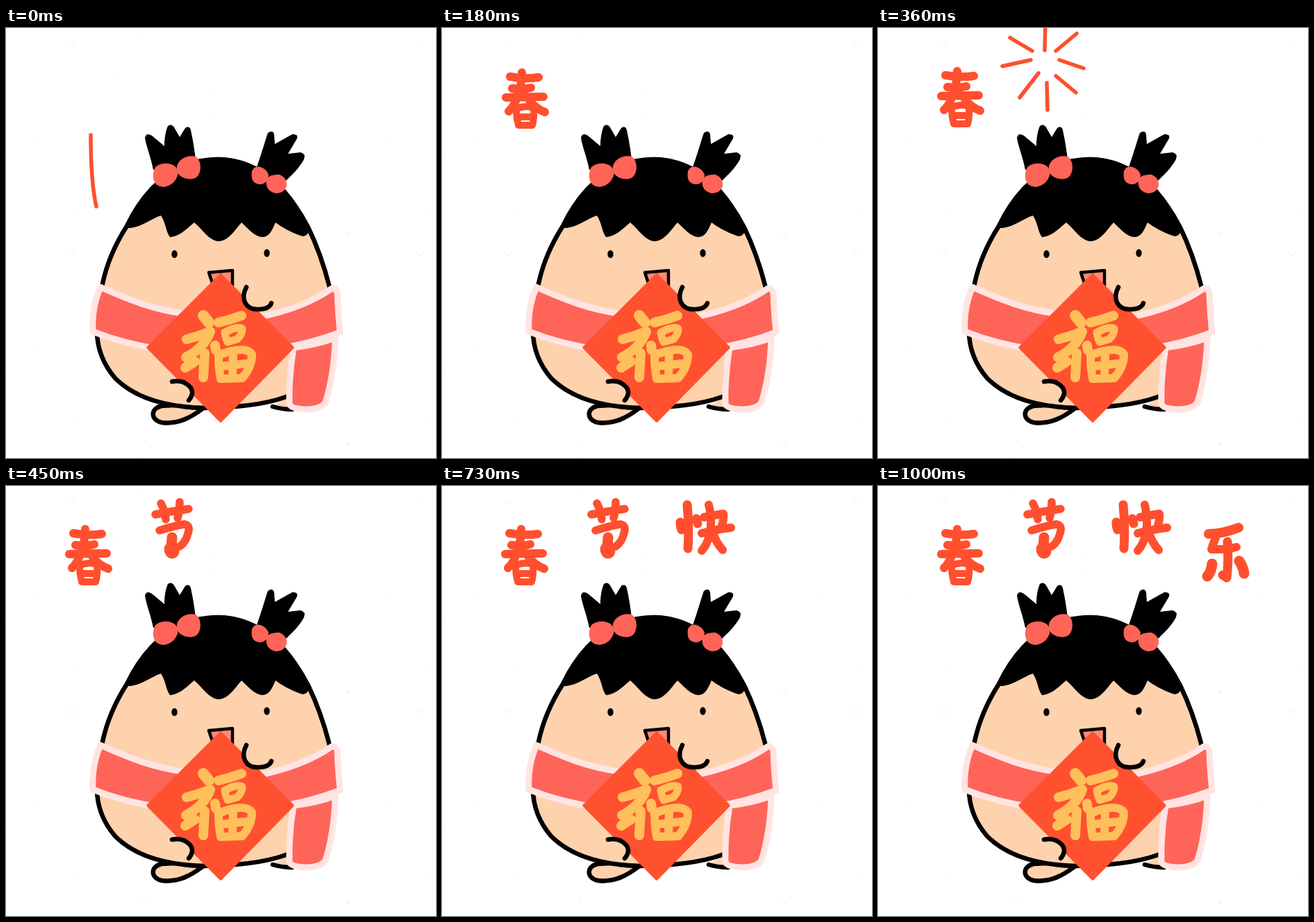
An HTML page for the animation above (1.36 s loop, 619 by 619 pixels).

```html
<!DOCTYPE html>
<html lang="zh">
<head>
<meta charset="utf-8">
<title>春节快乐</title>
<style>
  html, body { margin: 0; width: 100%; height: 100%; overflow: hidden; background: #fff; }
  svg { display: block; width: 100%; height: 100%; }
  path { stroke-linecap: round; stroke-linejoin: round; }
  .skin { fill: #ffd2ae; }
  .ink { stroke: #000; stroke-width: 6.5; }
  .open { fill: none; }
  .scarf { fill: #ff6459; stroke: #ffe4e2; stroke-width: 9; }
  .bow { fill: #ff6459; }
  .red { fill: none; stroke: #ff4f2e; }
  .gold { fill: none; stroke: #ffbf5a; }

  /* rocket trail and burst: lit for 90 ms, placed by --at */
  .flash { stroke-width: 5.5; animation: flash 1360ms step-end infinite; animation-delay: calc(var(--at) - 1360ms); }
  .word { animation: 1360ms step-end infinite; }
  .chun { animation-name: chun, settle; }
  .jie { animation-name: jie; }
  .kuai { animation-name: kuai; }
  .le { animation-name: le; }
  @keyframes flash { 0% { opacity: 1; } 6.6176% { opacity: 0; } 100% { opacity: 0; } }
  @keyframes chun { 0% { opacity: 0; } 13.2353% { opacity: 1; } 100% { opacity: 1; } }
  @keyframes jie { 0% { opacity: 0; } 33.0882% { opacity: 1; } 100% { opacity: 1; } }
  @keyframes kuai { 0% { opacity: 0; } 53.6765% { opacity: 1; } 100% { opacity: 1; } }
  @keyframes le { 0% { opacity: 0; } 73.5294% { opacity: 1; } 100% { opacity: 1; } }
  @keyframes settle { 0% { transform: translate(1px, 2px); } 19.8529% { transform: none; } 100% { transform: none; } }
</style>
</head>
<body>
<svg viewBox="0 0 619 619" role="img" aria-label="春节快乐 福">
  <defs>
    <pattern id="paper" width="500" height="303" patternUnits="userSpaceOnUse">
      <path fill="none" stroke="#ececec" stroke-width="1.2" d="M70 30h0M90 20h3M98 21h2M94 24h3M193 12l1 1M204 20h0M157 73h1M130 40h0M45 156h1M110 133h0M18 38h0M1 188h0M45 240h0M105 260h1M30 225h0M83 212h0M295 97v1M295 125h1M475 125h0M490 295l5 3M60 275h0M198 290l3 2"/>
    </pattern>
    <path id="trail" d="M122 154Q122 222 130 257"/>
    <path id="burst" d="M241-9L240 32M190 14L222 33M179 55L220 46M231 65L204 100M243 79L244 118M256 69L285 93M261 46L296 58M256 33L286 8"/>
  </defs>
  <rect width="619" height="619" fill="url(#paper)"/>

  <!-- feet and body -->
  <path class="skin ink" d="M224 544C207 548 208 565 225 568C248 571 267 560 283 548L262 542Z"/>
  <path class="skin" d="M384 545L412 549L410 528Z"/>
  <path class="ink open" d="M384 545Q397 549 412 549"/>
  <path class="skin ink" d="M307 189C366 191 405 230 435 287C450 318 458 343 465 370C480 425 475 476 440 511C427 522 416 528 403 531C370 543 330 546 286 547C236 546 188 535 157 504C140 484 131 463 131 436C131 412 134 390 139 368C146 335 158 310 174 285C204 222 252 188 307 189Z"/>

  <!-- hair -->
  <path d="M172 285C193 238 245 187 307 186C368 188 413 234 436 291Q434 302 424 299Q402 291 388 280C383 291 379 301 369 301C357 300 349 289 339 280C330 290 320 307 306 307C292 306 283 290 271 280C260 289 250 300 236 301C230 293 230 280 223 270C210 274 196 286 179 288Q174 288 172 285Z"/>
  <path d="M212 204C208 184 202 171 200 158Q202 150 210 155L228 170C228 158 230 148 233 141Q238 137 242 143L250 157L258 144Q264 140 266 147Q271 170 273 190L250 208Z"/>
  <path d="M361 200C368 181 372 165 377 151Q384 146 386 153L387 167L412 153Q421 152 419 159L406 181L424 179Q432 181 429 189C422 202 412 211 402 221L378 217Z"/>
  <g class="bow">
    <path d="M214 202C220 193 238 193 245 201Q250 208 245 217C239 228 224 233 215 224Q209 214 214 202Z"/>
    <path d="M246 199C249 187 264 182 273 185C282 191 282 208 274 215C264 221 251 216 246 207Z"/>
    <path d="M354 206Q358 198 366 200Q375 203 378 211Q378 222 368 225Q351 226 354 206Z"/>
    <path d="M375 217Q381 210 394 211Q405 216 404 227Q401 238 388 238Q372 234 375 217Z"/>
  </g>

  <!-- face -->
  <ellipse cx="242.500" cy="325.500" rx="4.200" ry="5.800"/>
  <ellipse cx="375.500" cy="324" rx="4.200" ry="5.800"/>
  <path d="M292 352L326 349L326 374L298 370Z" fill="#ff8977" stroke="#000" stroke-width="4.500"/>

  <!-- scarf -->
  <path class="scarf" d="M136 373C176 391 210 405 261 412L226 463C190 458 155 449 125 437Q123 402 136 373Z"/>
  <path class="scarf" d="M360 417C402 409 440 395 469 375Q474 373 477 381Q478 412 481 438Q440 454 390 462Z"/>
  <path class="scarf" d="M414 460Q448 456 474 446C473 485 467 516 460 539Q454 548 435 549Q410 549 408 541Q407 501 414 460Z"/>

  <!-- charm -->
  <path d="M309 356L412 460L309 565L205 460Z" fill="#ff512f" stroke="#ff512f" stroke-width="5"/>
  <g class="gold">
    <path stroke-width="16" d="M284 414L292 424"/>
    <path stroke-width="14" d="M260 448Q277 444 294 437Q286 460 259 474M286 468L284 503M258 489L272 480M301 457L302 464"/>
    <path stroke-width="14" d="M306 424Q323 420 339 414"/>
    <path stroke-width="11" d="M315 438Q316 446 319 452M315 438Q334 428 340 433Q340 441 333 448L319 452"/>
    <path stroke-width="12" d="M306 471Q306 490 309 504M306 471Q345 456 354 470Q354 488 340 504M310 487L346 483M327 467L326 502M309 505L340 504"/>
  </g>

  <!-- hands -->
  <g class="skin ink">
    <path stroke="none" d="M346 373C337 390 345 405 362 405C373 405 380 402 382 396Z"/>
    <path class="open" d="M346 373C337 390 345 405 362 405C373 405 380 402 382 396"/>
    <path stroke="none" d="M239 509C256 505 269 517 268 526Q267 532 263 536Z"/>
    <path class="open" d="M239 509C256 505 269 517 268 526Q267 532 263 536"/>
  </g>

  <!-- greeting -->
  <g class="red word chun">
    <path stroke-width="12" d="M97 68Q119 72 138 69M100 85Q115 87 127 84M91 98Q119 97 145 97M114 62Q114 80 108 94Q104 110 95 118M124 101Q133 114 147 119"/>
    <path stroke-width="10" d="M106 114Q106 128 109 137M106 114Q124 108 131 114Q132 128 129 138M109 126H129M109 138H129"/>
  </g>
  <g class="red word jie">
    <path stroke-width="11.500" d="M215 41Q240 36 263 33M223 25Q229 36 230 48M250 23Q250 36 247 46M221 64Q243 57 257 55Q266 57 262 68Q259 81 250 87"/>
    <path stroke-width="15" d="M239 74L238 90"/>
    <path stroke-width="21" d="M238 91L239 94"/>
  </g>
  <g class="red word kuai">
    <path stroke-width="13" d="M343 52Q343 59 345 63M353 27Q356 60 354 90M366 47L368 54"/>
    <path stroke-width="12" d="M377 45Q392 42 405 40Q406 49 402 60M374 68Q397 62 416 60M384 27Q389 49 386 66Q383 83 374 93M390 67Q394 81 404 92"/>
  </g>
  <g class="red word le">
    <path stroke-width="14" d="M476 69Q495 69 519 60"/>
    <path stroke-width="12" d="M487 72Q483 82 480 91Q501 92 516 88"/>
    <path stroke-width="13" d="M503 80Q505 108 502 132L496 128"/>
    <path stroke-width="15" d="M481 112Q480 123 474 130M520 108Q526 117 527 126"/>
  </g>

  <!-- fireworks -->
  <g class="red">
    <use class="flash" href="#trail" style="--at: 0ms"/>
    <use class="flash" href="#burst" x="-123" y="41" style="--at: 90ms"/>
    <use class="flash" href="#trail" x="119" y="-45" style="--at: 270ms"/>
    <use class="flash" href="#burst" style="--at: 360ms"/>
    <use class="flash" href="#trail" x="217" y="-45" style="--at: 550ms"/>
    <use class="flash" href="#burst" x="115" y="3" style="--at: 640ms"/>
    <use class="flash" href="#trail" x="381" y="-15" style="--at: 820ms"/>
    <use class="flash" href="#burst" x="258" y="39" style="--at: 910ms"/>
  </g>
</svg>
</body>
</html>
```
